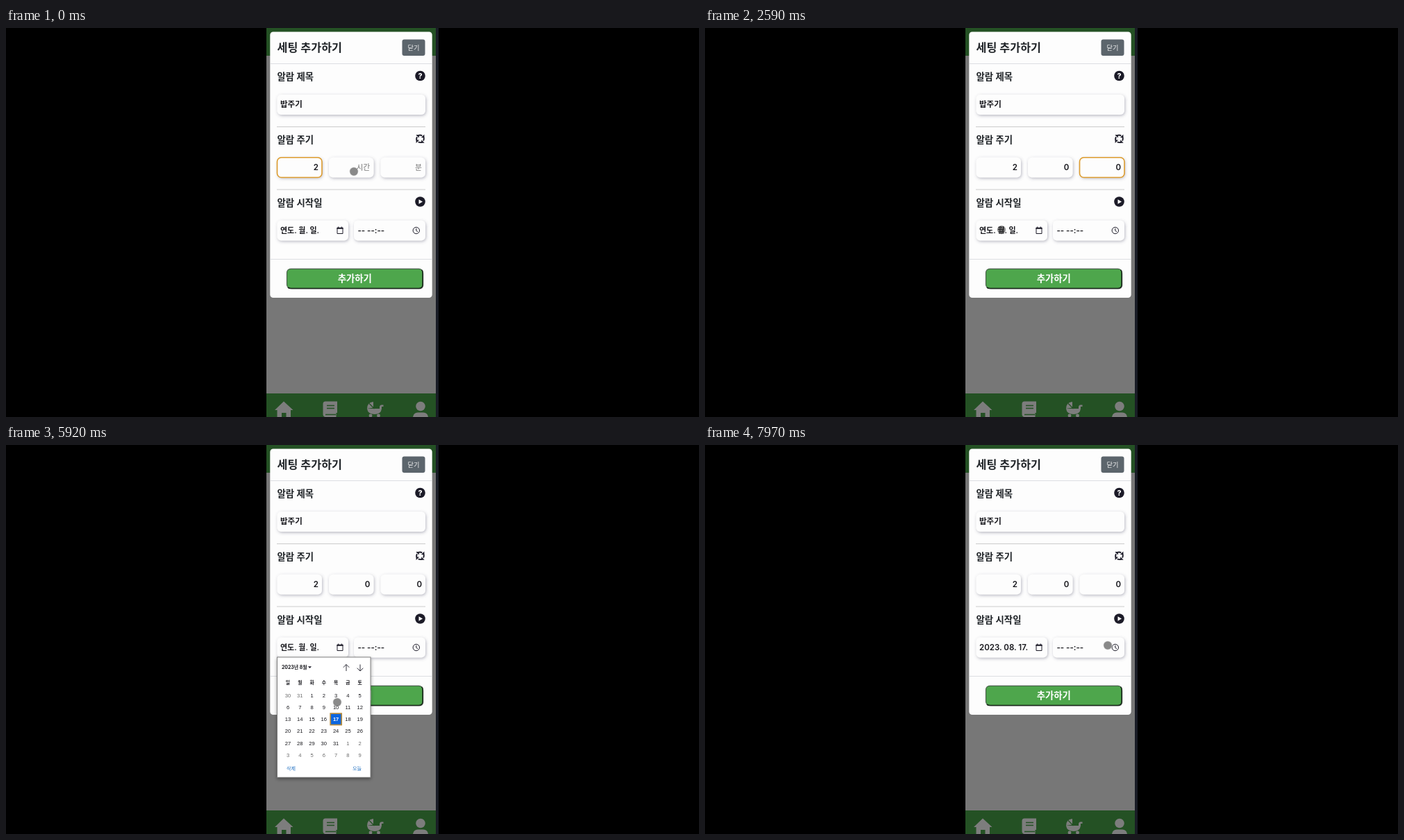
These frames come from a looping animation (998 px wide and 561 px high, 8 s). An HTML page:

```html
<!DOCTYPE html>
<html lang="ko">
<head>
<meta charset="utf-8">
<title>세팅 추가하기</title>
<style>
  html, body { margin: 0; width: 100%; height: 100%; overflow: hidden; background: #000; }
  svg { display: block; width: 100%; height: 100%; }
  text { font-family: Inter, "Noto Sans CJK KR", "Noto Sans CJK", sans-serif; fill: #17171c; white-space: pre; }
  .title { font-size: 16.2px; font-weight: 600; fill: #212529; }
  .label { font-size: 13.4px; font-weight: 600; fill: #212529; }
  .value { font-size: 11.5px; font-weight: 600; }
  .blank { font-size: 11px; }
  .hint { font-size: 10.8px; font-weight: 500; fill: #757575; }
  .end { text-anchor: end; }
  .mid { text-anchor: middle; }
  .field { fill: #fdfdfd; filter: url(#soft); }
  .ring { fill: none; stroke: #dd9c2e; stroke-width: 1.6; }
  .rule { stroke: #cbcbcb; stroke-width: 1; }
  .ink { fill: #1c1b28; }
  .line { fill: none; stroke: #1c1b28; }
  .nav { fill: #7d7d7d; }
  .day { font: 7.6px "Liberation Sans", Arial, sans-serif; text-anchor: middle; }
  .week { font-size: 6.8px; font-weight: 600; text-anchor: middle; }
  .link { font-size: 7.1px; font-weight: 500; fill: #2a76c4; }
</style>
</head>
<body>
<svg viewBox="0 0 998 561">
  <defs>
    <filter id="soft" x="-20%" y="-40%" width="140%" height="190%">
      <feDropShadow dx="1" dy="1.5" stdDeviation="2.1" flood-color="#55556e" flood-opacity=".42"/>
    </filter>
    <filter id="lift" x="-20%" y="-20%" width="140%" height="140%">
      <feDropShadow dx="0" dy="2" stdDeviation="2.5" flood-opacity=".4"/>
    </filter>
  </defs>

  <rect width="998" height="561"/>
  <rect x="375" width="244" height="561" fill="#777"/>
  <rect x="375" width="244" height="40" fill="#245124"/>
  <rect x="375" y="527" width="244" height="34" fill="#245124"/>
  <rect x="619" width="4" height="561" fill="#191c25"/>

  <g class="nav">
    <path d="M400 538.5 L413.5 551 H410 V561 H403.5 V555 H397 V561 H390.5 V551 H387 Z"/>
    <path d="M460 538.5 H477 V555 H475.5 V561 H459.5 Q456.5 560 456.5 557 V542 Q456.5 538.5 460 538.5 Z"/>
    <path d="M462 544.5 H473 M462 548.5 H473 M460 557.5 H475" stroke="#245124" stroke-width="1.6"/>
    <path d="M529 539 Q520 540 520 549 H538 V547 Q538 543.5 541 543.5 H543.5 V546 H541 V549 Q540 557 531 557 Q521 557 520 549 L529 547.5 Z"/>
    <path d="M530.5 549 L523 541.5" stroke="#245124" stroke-width="1.2"/>
    <circle cx="525" cy="559" r="2.4"/><circle cx="536.5" cy="559" r="2.4"/>
    <circle cx="597" cy="545.5" r="6.8"/>
    <path d="M586 561 Q587 554.5 593 554.5 H601 Q607 554.5 608 561 Z"/>
  </g>

  <rect x="380.3" y="5.4" width="233.4" height="383.6" rx="4.5" fill="#fdfdfd"/>
  <path d="M381 51.5 H613 M381 333.5 H613" stroke="#dcdee2"/>
  <path class="rule" d="M390 142.5 H604 M390 233 H604"/>
  <text class="title" x="390.5" y="34">세팅 추가하기</text>
  <rect x="570.5" y="16.5" width="33" height="23.5" rx="3" fill="#5c656c"/>
  <text class="mid" x="587" y="31.7" style="font-size:9.2px;fill:#f4f4f4">닫기</text>
  <text class="label" x="390.5" y="75">알람 제목</text>
  <text class="label" x="390.5" y="165.7">알람 주기</text>
  <text class="label" x="390.5" y="256.5">알람 시작일</text>

  <circle class="ink" cx="596.5" cy="69" r="7.3"/>
  <text class="mid" x="596.5" y="72.8" style="font-size:10.5px;font-weight:800;fill:#fff">?</text>
  <g id="spin" transform="translate(596.5 159.8)"></g>
  <circle class="ink" cx="596.5" cy="250.5" r="7.3"/>
  <path d="M594.5 247.2 L600 250.5 L594.5 253.8 Z" fill="#fff"/>

  <g id="fields"></g>
  <text class="value" x="395" y="114.3">밥주기</text>
  <text class="value end" x="450" y="205.4">2</text>
  <text id="hour" y="205.4" x="524.3"></text>
  <text id="minute" y="205.4" x="599"></text>
  <rect id="yearMark" x="395" y="285.5" width="20.5" height="13" fill="#afd2fb"/>
  <text id="date" x="395" y="296.1"></text>
  <text class="value" x="506.5" y="296.1">-- --:--</text>
  <path class="line" d="M477 288.3 H485 V296.5 H477 Z"/>
  <path class="line" d="M476.5 288.8 H485.5" stroke-width="2"/>
  <path class="line" d="M478.5 286.5 V288 M483.5 286.5 V288"/>
  <circle class="line" cx="590.8" cy="292" r="4.7"/>
  <path class="line" d="M590.8 289 V292.3 L593 293.7"/>

  <rect x="406" y="349" width="195.5" height="28" rx="6" fill="#777" opacity=".45"/>
  <rect x="404.5" y="347.3" width="195.7" height="28.2" rx="5.5" fill="#4ea64c" stroke="#48604a" stroke-width="1.2"/>
  <path d="M406 374 Q407 375.5 410 375.5 H594.5 Q600.2 375.5 600.2 370 V353 Q600.2 350 598.5 348.8" fill="none" stroke="#18281a" stroke-width="1.6"/>
  <text class="mid" x="502.3" y="366.2" style="font-size:13.4px;font-weight:600;fill:#fff">추가하기</text>

  <rect id="ring" class="ring" rx="6"/>

  <g id="picker">
    <rect x="390.5" y="306" width="134.5" height="173.3" fill="#fff" stroke="#777" stroke-width=".9" filter="url(#lift)"/>
    <text x="397" y="323" style="font-size:6.9px;font-weight:700">2023년 8월</text>
    <path class="ink" d="M435 319.3 H440 L437.5 322 Z"/>
    <path class="line" stroke-width=".9" d="M490 326 V316.5 M485.7 320.8 L490 316.5 L494.3 320.8 M510 316.5 V326 M505.7 321.7 L510 326 L514.3 321.7"/>
    <rect x="467.2" y="387.2" width="16" height="16.4" fill="#0b66e0" stroke="#b58a3c" stroke-width="1.7"/>
    <g id="days"></g>
    <text class="link" x="404" y="468.8">삭제</text>
    <text class="link" x="499" y="468.8">오늘</text>
  </g>

  <circle id="cursor" r="6.2" fill="#161616" fill-opacity=".5" stroke="#fff" stroke-opacity=".5"/>
</svg>
<script>
const LOOP = 8000;
const $ = id => document.getElementById(id);

function add(parent, tag, attrs, text = '') {
  const node = document.createElementNS('http://www.w3.org/2000/svg', tag);
  for (const name in attrs) node.setAttribute(name, attrs[name]);
  node.textContent = text;
  return parent.appendChild(node);
}

const boxes = {
  name: [390.5, 96, 213.5, 29],
  day: [390.5, 186.7, 64.5, 28.8],
  hour: [465, 186.7, 64.5, 28.8],
  minute: [539.5, 186.7, 64.5, 28.8],
  date: [390.5, 277.5, 102.5, 29],
  time: [501, 277.5, 103, 29]
};
const placeBox = (node, [x, y, width, height]) =>
  Object.entries({ x, y, width, height }).forEach(([k, v]) => node.setAttribute(k, v));
for (const box of Object.values(boxes)) placeBox(add($('fields'), 'rect', { class: 'field', rx: 6 }), box);

// Four arrows chasing each other around a square
for (let turn = 0; turn < 4; turn++) {
  const arrow = add($('spin'), 'g', { transform: `rotate(${turn * 90})` });
  add(arrow, 'path', { class: 'line', 'stroke-width': 1.9, d: 'M-2.6 -4.9 Q0 -5.9 2.8 -4.6' });
  add(arrow, 'path', { class: 'ink', d: 'M5.9 -6.2 V-1.7 H1.4 Z' });
}

// August 2023 grid, starting on Sunday 30 July
const column = i => 406 + 17.28 * i;
[...'일월화수목금토'].forEach((name, i) =>
  add($('days'), 'text', { class: 'week', x: column(i), y: 345.3 }, name));
for (let i = 0; i < 42; i++) {
  const day = new Date(2023, 6, 30 + i);
  const today = i === 18;
  const color = today ? '#fff' : day.getMonth() === 7 ? '#17171c' : '#6c6c6c';
  add($('days'), 'text', {
    class: 'day', x: column(i % 7), y: 363.5 + 17.28 * Math.floor(i / 7),
    style: `fill:${color};font-weight:${today ? 700 : 400}`
  }, day.getDate());
}

// Pointer stops: time, x, y
const route = [
  [0, 501, 207], [850, 501, 206], [1300, 557, 203], [1950, 560, 203],
  [2550, 427, 291], [3250, 427, 291], [3750, 407, 291], [4350, 407, 291],
  [4900, 481, 292], [5450, 481, 292], [5920, 477, 371], [6200, 475, 395],
  [6600, 475, 396], [7050, 501, 463], [7300, 501, 463], [7970, 580, 289], [8000, 581, 289]
];
// Focus changes: time, field
const focusSteps = [[0, 'day'], [320, 'hour'], [1500, 'minute'], [2850, 'date'], [5200, '']];

function pointerAt(t) {
  const i = Math.max(1, route.findIndex(stop => stop[0] > t));
  const [t0, x0, y0] = route[i - 1], [t1, x1, y1] = route[i];
  const p = (t - t0) / (t1 - t0), e = p * p * (3 - 2 * p);
  return [x0 + (x1 - x0) * e, y0 + (y1 - y0) * e];
}

function setText(id, text, style) {
  $(id).textContent = text;
  $(id).setAttribute('class', style);
}
const setNumber = (id, typed, hint) => setText(id, typed ? '0' : hint, typed ? 'value end' : 'hint end');
const show = (id, on) => $(id).setAttribute('visibility', on ? 'visible' : 'hidden');

function draw(now) {
  const t = now % LOOP;
  const [x, y] = pointerAt(t);
  $('cursor').setAttribute('transform', `translate(${x} ${y})`);

  const focus = focusSteps.filter(step => step[0] <= t).pop()[1];
  show('ring', focus);
  if (focus) placeBox($('ring'), boxes[focus]);

  setNumber('hour', t >= 700, '시간');
  setNumber('minute', t >= 1900, '분');
  show('yearMark', focus === 'date');
  const picked = t >= 6450;
  setText('date', picked ? '2023. 08. 17.' : '연도. 월. 일.', picked ? 'value' : 'value blank');
  show('picker', t >= 5200 && !picked);
}

const start = performance.now();
function tick() {
  draw(performance.now() - start);
  requestAnimationFrame(tick);
}
tick();
</script>
</body>
</html>
```
